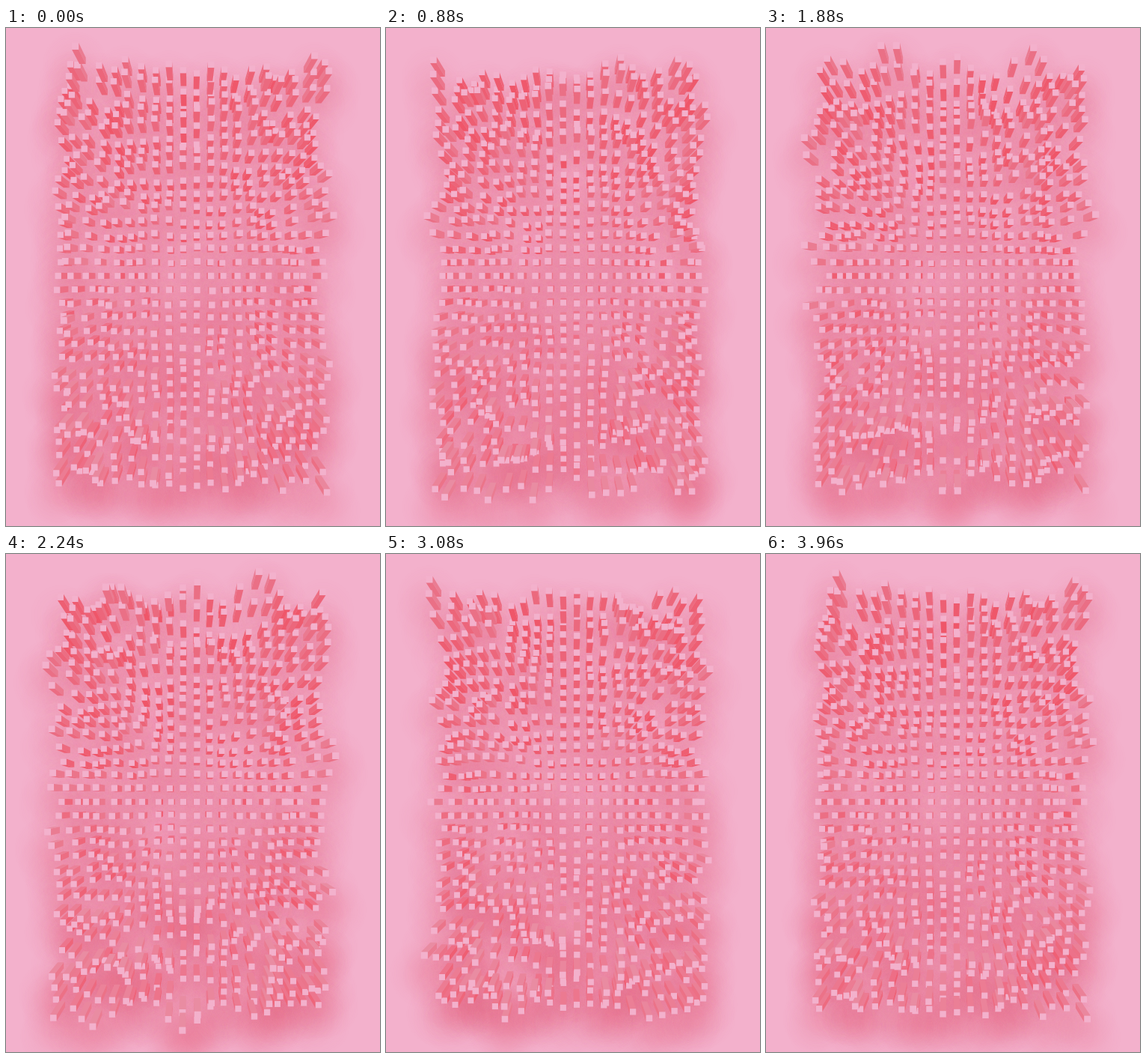
Animation, 500 px wide and 665 px high, one loop 4 s. Source, as an HTML page with a canvas:

```html
<!DOCTYPE html>
<html lang="en">
<head>
<meta charset="utf-8">
<title>Floating blocks</title>
<style>
  html, body { margin: 0; width: 100%; height: 100%; overflow: hidden; background: #f3b1cc; }
  canvas { display: block; }
</style>
</head>
<body>
<canvas id="stage" width="500" height="665"></canvas>
<script>
const W = 500, H = 665, LOOP = 4000, STEP = 40;
const COLS = 20, ROWS = 31, GAP = 18, HALF = 4;
const VX = 246, VY = 331;          // vanishing point
const DEPTH = 0.936;               // scale of the far end of a block
const GLOW = 50;                   // shadow radius
const BACK = '#f3b1cc';
// Face colours of the lowest and the highest blocks.
const FACES = {
  under: [[239, 86, 105], [234, 112, 134]],
  side: [[239, 94, 114], [234, 124, 146]],
  lit: [[238, 110, 134], [233, 140, 162]]
};
const ctx = document.getElementById('stage').getContext('2d');

let seed = 71;
function rand() {
  seed = (seed * 16807) % 2147483647;
  return seed / 2147483647;
}

// Looping noise: plane waves that turn a whole number of times per loop.
const waves = Array.from({ length: 26 }, (_, i) => {
  const angle = rand() * Math.PI * 2;
  const k = 0.6 + rand() * 1.7;
  return {
    kx: k * Math.cos(angle),
    ky: k * Math.sin(angle),
    turns: [1, 2, -2, -1, 2, -3][i % 6],
    phase: rand() * Math.PI * 2
  };
});

function noise(x, y, turn) {
  let sum = 0;
  for (const w of waves) sum += Math.cos(w.kx * x + w.ky * y + w.turns * turn + w.phase);
  return sum / Math.sqrt(waves.length / 2);
}

const clamp = (v, lo, hi) => Math.min(hi, Math.max(lo, v));

function shade(face, t) {
  const [low, high] = FACES[face];
  return `rgb(${low.map((v, i) => Math.round(v + (high[i] - v) * t))})`;
}

const blocks = [];
for (let r = 0; r < ROWS; r++) {
  for (let c = 0; c < COLS; c++) {
    blocks.push({
      c, r, s: 1, n: 0,
      x: (c - (COLS - 1) / 2) * GAP,
      y: (r - (ROWS - 1) / 2) * GAP
    });
  }
}

function makeShadow() {
  const cv = document.createElement('canvas');
  cv.width = cv.height = GLOW * 2;
  const g = cv.getContext('2d');
  const fill = g.createRadialGradient(GLOW, GLOW, 0, GLOW, GLOW, GLOW);
  for (let i = 0; i <= 8; i++) {
    const a = Math.pow(Math.cos(i / 8 * Math.PI / 2), 2);
    fill.addColorStop(i / 8, `rgba(231,84,112,${a})`);
  }
  g.fillStyle = fill;
  g.fillRect(0, 0, GLOW * 2, GLOW * 2);
  return cv;
}
const shadow = makeShadow();

function quad(color, x1, y1, x2, y2) {
  ctx.fillStyle = color;
  ctx.beginPath();
  ctx.moveTo(VX + x1, VY + y1);
  ctx.lineTo(VX + x2, VY + y2);
  ctx.lineTo(VX + x2 * DEPTH, VY + y2 * DEPTH);
  ctx.lineTo(VX + x1 * DEPTH, VY + y1 * DEPTH);
  ctx.fill();
}

function drawShadow(b) {
  const low = clamp((b.y + 40) / 160, 0, 1);
  ctx.globalAlpha = (0.04 + 0.035 * low) * clamp(1 + 0.4 * b.n, 0.15, 2);
  ctx.drawImage(shadow, VX + b.x * b.s - GLOW, VY + b.y * b.s + 24 - GLOW);
}

function drawBlock(b) {
  const h = HALF * b.s, x = b.x * b.s, y = b.y * b.s;
  const left = x - h, right = x + h, top = y - h, bottom = y + h;
  const t = clamp((b.n + 1.2) / 2.8, 0, 1);
  if (right < 0) quad(shade('side', t), right, top, right, bottom);
  if (left > 0) quad(shade('side', t), left, top, left, bottom);
  if (bottom < 0) quad(shade('under', t), left, bottom, right, bottom);
  if (top > 0) quad(shade('lit', t), left, top, right, top);
  ctx.fillStyle = BACK;
  ctx.fillRect(VX + left, VY + top, h * 2, h * 2);
}

function draw(ms) {
  const turn = Math.floor(ms % LOOP / STEP) * STEP / LOOP * Math.PI * 2;
  for (const b of blocks) {
    b.n = clamp(noise(b.c, b.r, turn), -2.2, 2.5);
    b.s = 1 / (0.978 - 0.04 * b.n);
  }
  ctx.globalAlpha = 1;
  ctx.fillStyle = BACK;
  ctx.fillRect(0, 0, W, H);
  blocks.forEach(drawShadow);
  ctx.globalAlpha = 1;
  [...blocks].sort((a, b) => a.s - b.s).forEach(drawBlock);
}

const start = performance.now();
function tick() {
  draw(performance.now() - start);
  requestAnimationFrame(tick);
}
tick();
</script>
</body>
</html>
```
